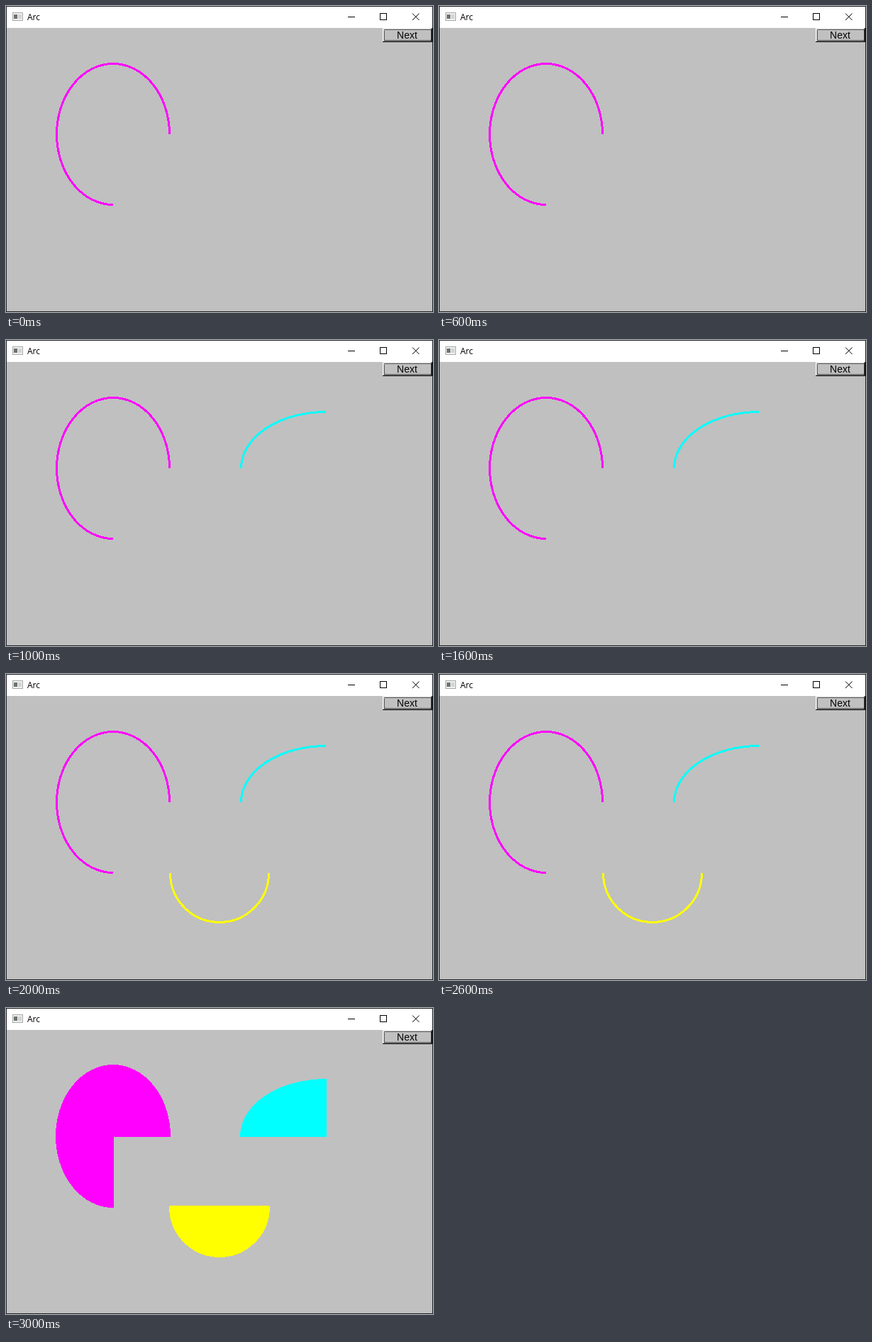
Write an HTML page that moves like this. It is 602 px wide and 432 px high and loops after 4 s.

```html
<!DOCTYPE html>
<html lang="en">
<head>
<meta charset="utf-8">
<title>Arc</title>
<style>
  html, body { margin: 0; width: 100%; height: 100%; overflow: hidden; }
  svg { display: block; }
  .title { font: 12px "Open Sans", "Noto Sans", sans-serif; }
  .label { font: 14px "Liberation Sans", Arial, sans-serif; text-anchor: middle; }
  .line { fill: none; stroke: #000; }
  #arcs { fill: none; stroke-width: 3; stroke-linejoin: round; }
</style>
</head>
<body>
<svg width="602" height="432" shape-rendering="crispEdges">
  <!-- window -->
  <rect width="602" height="432" fill="#1c2226"/>
  <rect x="1" y="1" width="600" height="30" fill="#fff"/>
  <rect x="1" y="31" width="600" height="400" fill="#c0c0c0"/>

  <!-- title bar -->
  <rect x="9.5" y="9.5" width="14" height="11" fill="#f0f0f0" stroke="#a8a8a8"/>
  <rect x="11" y="12" width="5" height="6" fill="#68736c"/>
  <rect x="17" y="12" width="5" height="6" fill="#d4d4d4"/>
  <text class="title" x="30" y="20">Arc</text>
  <path class="line" d="M482 15.5h10M527.5 10.5h9v9h-9z"/>
  <path class="line" d="M573 10.5l9.5 9.5M582.5 10.5l-9.5 9.5" shape-rendering="auto"/>

  <!-- button -->
  <path class="line" d="M531 50.5h69.5V31"/>
  <path class="line" d="M532 49.5h67.5V32" style="stroke:#808080"/>
  <path class="line" d="M531.5 50V31.5H600" style="stroke:#fff"/>
  <rect class="line" x="533.5" y="33.5" width="66" height="15" stroke-dasharray="1 1"/>
  <text class="label" x="565.5" y="46">Next</text>

  <g id="arcs"></g>
</svg>
<script>
  // Each shape: colour, time of appearance, arc, and the way back to its centre.
  const PIE_TIME = 3000, LOOP = 4000;
  const shapes = [
    ["#f0f", 0, "M230.5 180.9A79.5 99.5 0 1 0 150.9 280.5", "V180.9H150.9Z"],
    ["#0ff", 1000, "M331.5 180.9A119.5 79.5 0 0 1 450.9 101.5", "V180.9Z"],
    ["#ff0", 2000, "M231.5 280.9A69.5 69.5 0 0 0 370.5 280.9", "Z"]
  ].map(([color, start, arc, close]) => {
    const path = document.createElementNS("http://www.w3.org/2000/svg", "path");
    path.setAttribute("stroke", color);
    document.getElementById("arcs").append(path);
    return { path, color, start, arc, close };
  });

  const origin = performance.now();

  function draw(now) {
    const t = Math.max(0, now - origin) % LOOP;
    const filled = t >= PIE_TIME;
    for (const { path, color, start, arc, close } of shapes) {
      path.setAttribute("d", t < start ? "" : filled ? arc + close : arc);
      path.setAttribute("fill", filled ? color : "none");
    }
    requestAnimationFrame(draw);
  }
  draw(origin);
</script>
</body>
</html>
```
